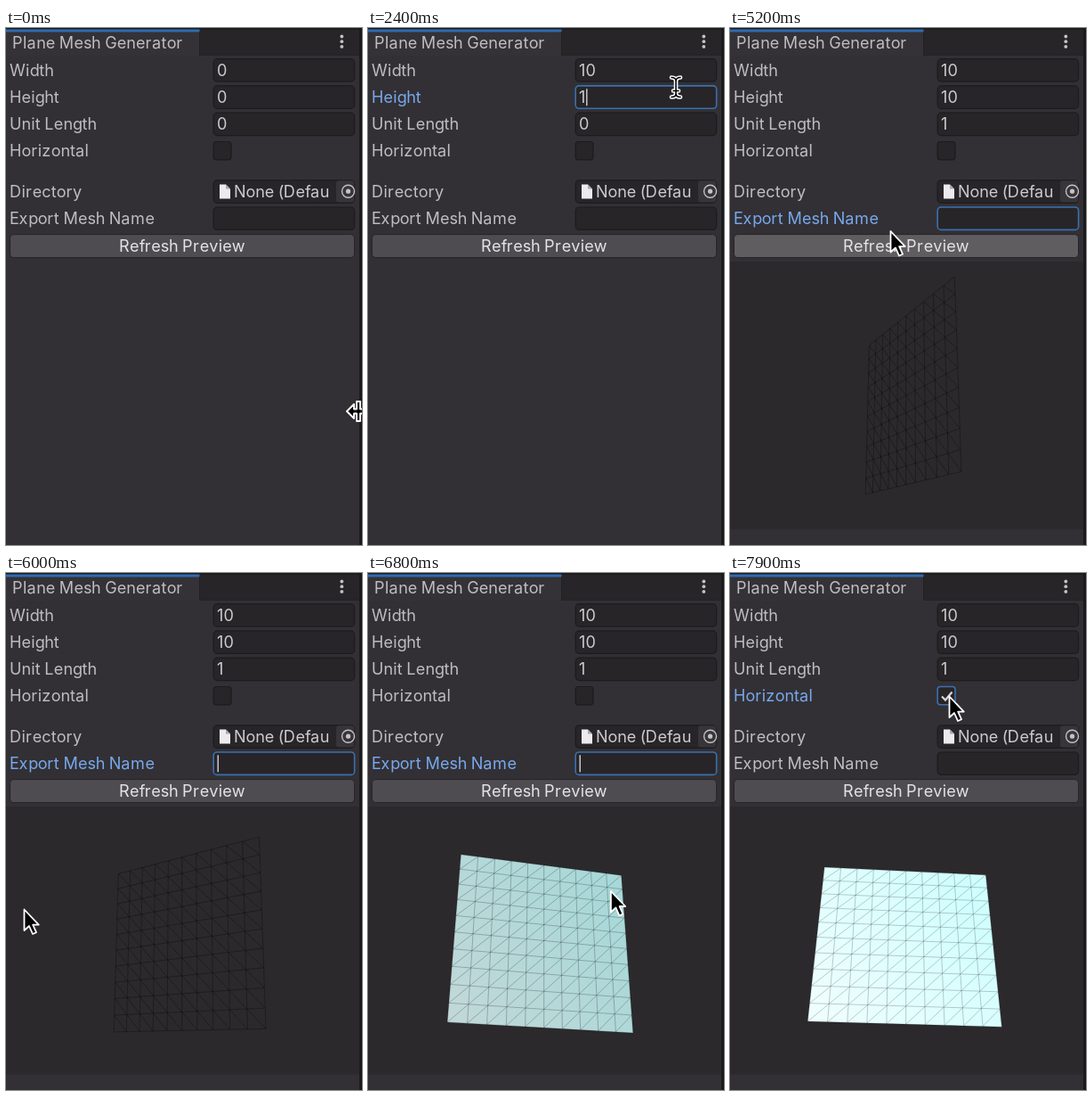
An HTML page for the animation above (8 s loop, 400x580 px).

```html
<!DOCTYPE html>
<html lang="en">
<head>
<meta charset="utf-8">
<title>Plane Mesh Generator</title>
<style>
html, body { margin: 0; width: 100%; height: 100%; overflow: hidden; background: #323034; }
svg { display: block; width: 100vw; height: 100vh; }
text { font: 18.1px Inter, "Open Sans", sans-serif; font-optical-sizing: none; font-kerning: none; fill: #bfbdc0; white-space: pre; }
.box { fill: #272528; stroke: #1c1b1d; stroke-width: 1.2; }
.box.on { stroke: #3a70ae; stroke-width: 1.6; }
.label.on { fill: #78a8ec; }
.value { fill: #cccacd; }
.caret { fill: #c8c6c9; }
.cursor path { stroke-linejoin: round; stroke-linecap: round; }
</style>
</head>
<body>
<svg id="stage" viewBox="0 0 400 580" preserveAspectRatio="none"></svg>
<script>
const NS = 'http://www.w3.org/2000/svg';
const stage = document.getElementById('stage');
const LOOP = 8000, STEP = 100, LABEL_LAG = 200;

function el(tag, attrs = {}, parent = stage) {
  const node = document.createElementNS(NS, tag);
  set(node, attrs);
  parent.appendChild(node);
  return node;
}
function set(node, attrs) { for (const key in attrs) node.setAttribute(key, attrs[key]); }
const show = (node, on) => { node.style.display = on ? '' : 'none'; };
const rect = (x, y, width, height, more) => el('rect', { x, y, width, height, ...more });
const clamp = (v, lo, hi) => Math.min(hi, Math.max(lo, v));

// The interface sets 12 px type on whole-pixel advances, then scales it up
const UI_SCALE = 1.51;
const ruler = document.createElement('canvas').getContext('2d');
ruler.font = '12px Inter, "Open Sans", sans-serif';
const advance = ch => Math.round(ruler.measureText(ch).width) * UI_SCALE;
const measure = text => [...text].reduce((sum, ch) => sum + advance(ch), 0);

function write(node, text, x) {
  if (node.textContent === text) return;
  const xs = [...text].map((ch, i) => (x + measure(text.slice(0, i))).toFixed(2));
  set(node, { x: xs.join(' ') });
  node.textContent = text;
}
function label(text, x, y, more) {
  const node = el('text', { y, ...more });
  write(node, text, x);
  return node;
}

// Window chrome
rect(0, 0, 400, 580, { fill: '#323034' });
rect(0, 0, 400, 31, { fill: '#272528' });
rect(0, 0, 400, 2, { fill: '#1d1c1e' });
rect(217, 30, 180, 1, { fill: '#232224' });
rect(0, 2, 217, 29, { fill: '#343236' });
rect(0, 1.5, 217.5, 3, { fill: '#2e6cb2' });
rect(217, 4, 1, 27, { fill: '#222123' });
label('Plane Mesh Generator', 7, 23.2);
for (const cy of [9.5, 15.2, 20.9]) el('circle', { cx: 377.3, cy, r: 1.9, fill: '#c4c2c5' });

// Form rows
const ROWS = {
  width: ['Width', 47], height: ['Height', 77.2], unit: ['Unit Length', 107.5],
  horizontal: ['Horizontal', 137.8], directory: ['Directory', 183.2], name: ['Export Mesh Name', 213.3]
};
const VALUE_X = 237;
const rows = {};
for (const id in ROWS) {
  const [title, y] = ROWS[id];
  const check = id === 'horizontal';
  rows[id] = {
    label: label(title, 4, y + 6.5, { class: 'label' }),
    box: rect(233.2, y - (check ? 10.3 : 12.3), check ? 19.8 : 158.4, check ? 20.3 : 25.4, { rx: check ? 3 : 4, class: 'box' }),
    pick: rect(236.5, y - 10, 13, 20, { fill: '#3d6797' }),
    value: el('text', { y: y + 6.5, class: 'value' }),
    caret: rect(238, y - 9, 1.5, 19, { class: 'caret' })
  };
}
const tick = el('path', { d: 'M238 138.5l4 4 7.5-9', fill: 'none', stroke: '#d8d6d9', 'stroke-width': 2.2 });

write(rows.directory.value, 'None (Defau', 256);
rect(371, 171.3, 20.3, 24.2, { rx: 3, fill: '#373539' });
el('path', { d: 'M240 175.5h7l5 5v11h-12z', fill: '#eceaed' });
el('path', { d: 'M247 175.5v5h5z', fill: '#aaa8ab' });
el('circle', { cx: 384.5, cy: 183.2, r: 7, fill: 'none', stroke: '#c4c2c5', 'stroke-width': 1.4 });
el('circle', { cx: 384.5, cy: 183.2, r: 2.6, fill: '#c4c2c5' });

const button = rect(4.5, 231.6, 387, 26, { rx: 4, stroke: '#252326', 'stroke-width': 1 });
const caption = 'Refresh Preview';
label(caption, 198 - measure(caption) / 2, 250.9, { style: 'fill:#e4e2e5' });

// Preview
const preview = el('g');
el('rect', { x: 0, y: 262, width: 397, height: 300.5, fill: '#2b292c' }, preview);
const shade = el('linearGradient', { id: 'shade', x1: 0, y1: 0.8, x2: 0.9, y2: 0.2 }, preview);
const stops = [0, 1].map(offset => el('stop', { offset }, shade));
const face = el('path', { fill: 'url(#shade)' }, preview);
const wire = el('path', { fill: 'none', stroke: '#000', 'stroke-width': 0.7 }, preview);
rect(397, 0, 3, 580, { fill: '#1a191b' });

// Cursors, hot spot at 0,0
const BEAM = 'M-5 -11Q0 -11 0 -7V7Q0 11 -5 11M5 -11Q0 -11 0 -7V7Q0 11 5 11M-3 4H3';
const CURSORS = {
  arrow: [['M0.5 1.5V25L6 20L10 29L14 27.2L10.2 18.6H16.8Z', '#000', '#fff', 1.8]],
  beam: [[BEAM, 'none', '#fff', 4.6], [BEAM, 'none', '#000', 1.6]],
  resize: [['M-13 0L-5 -8V-2.5H-2V-11H2V-2.5H5V-8L13 0L5 8V2.5H2V11H-2V2.5H-5V8Z', '#000', '#fff', 1.9]]
};
const cursors = {};
for (const kind in CURSORS) {
  cursors[kind] = el('g', { class: 'cursor' });
  for (const [d, fill, stroke, w] of CURSORS[kind])
    el('path', { d, fill, stroke, 'stroke-width': w }, cursors[kind]);
}

// Motion: [time, values...]
const POINTER = [
  [0, 396, 430], [900, 338, 48], [1000, 338, 48], [1200, 345, 77], [1300, 346, 66.5],
  [2900, 346, 66.5], [3400, 168, 171], [3500, 168, 171], [3900, 262, 212], [4000, 262, 212],
  [4300, 180, 226.5], [5200, 180, 226.5], [5500, 62, 366], [6000, 20, 376], [6100, 16, 378],
  [6400, 218, 401], [6900, 286, 344], [7100, 242, 249], [7300, 242, 246], [7800, 246, 140], [7900, 246, 137]
];
const ORBIT = [
  [5500, 120, 18], [6000, 145, 12], [6100, 138, 11], [6400, 42.7, 0], [6900, 6, 30], [7000, 4.3, 31]
];
const FOCUS = [[0, ''], [900, 'width'], [2200, 'height'], [2800, 'unit'], [4000, 'name'], [7700, 'horizontal']];
const TYPED = {
  width: [[0, '0'], [1700, '1'], [1900, '10']],
  height: [[0, '0'], [2400, '1'], [2600, '10']],
  unit: [[0, '0'], [3100, '1']],
  name: [[0, '']]
};

function tween(keys, t) {
  const i = keys.findIndex(k => k[0] > t);
  if (i === 0) return keys[0].slice(1);
  if (i < 0) return keys[keys.length - 1].slice(1);
  const a = keys[i - 1], b = keys[i], p = (t - a[0]) / (b[0] - a[0]);
  return a.slice(1).map((v, n) => v + (b[n + 1] - v) * p);
}
const hold = (keys, t) => keys.reduce((v, k) => (t >= k[0] ? k[1] : v), keys[0][1]);

function drawMesh(yaw, pitch) {
  const rad = Math.PI / 180;
  const cy = Math.cos(yaw * rad), sy = Math.sin(yaw * rad);
  const cp = Math.cos(pitch * rad), sp = Math.sin(pitch * rad);
  const at = (u, v) => {
    const z = u * sy;
    const s = 554 / (5.581 + z * cp - v * sp);
    return (197.7 + u * cy * s).toFixed(2) + ' ' + (412.4 + (v * cp + z * sp) * s).toFixed(2);
  };
  const line = (a, b, c, d) => `M${at(a, b)}L${at(c, d)}`;
  let d = '';
  for (let i = -5; i <= 5; i++) d += line(i / 5, -1, i / 5, 1) + line(-1, i / 5, 1, i / 5);
  for (let i = -9; i <= 9; i++) {
    const c = i / 5, lo = Math.max(-1, c - 1), hi = Math.min(1, c + 1);
    d += line(lo, c - lo, hi, c - hi);
  }
  // Only the front side is filled
  const front = cy * cp > 0;
  const lit = clamp((42.7 - yaw) / 38.4, -0.2, 1);
  const mix = (a, b) => Math.round(a + (b - a) * lit);
  show(face, front);
  set(face, { d: `M${at(-1, -1)}L${at(1, -1)}L${at(1, 1)}L${at(-1, 1)}Z` });
  [238, 207].forEach((red, i) =>
    set(stops[i], { 'stop-color': `rgb(${mix(42, red)},${mix(93, 254)},${mix(93, 254)})` }));
  set(wire, { d, 'stroke-opacity': 0.45 - 0.15 * Math.max(0, lit) });
}

function render(t) {
  const focus = hold(FOCUS, t), named = hold(FOCUS, t - LABEL_LAG);
  const blink = t < 5200 || Math.floor((t - 5200) / 470) % 2 === 1;
  for (const id in rows) {
    const r = rows[id], on = id === focus, keys = TYPED[id];
    r.box.classList.toggle('on', on);
    r.label.classList.toggle('on', id === named);
    let picked = false;
    if (keys) {
      const text = hold(keys, t);
      write(r.value, text, VALUE_X);
      set(r.caret, { x: VALUE_X + 0.5 + measure(text) });
      picked = on && text === '0';
    }
    show(r.pick, picked);
    show(r.caret, on && keys && !picked && (id !== 'name' || blink));
  }
  show(tick, t >= 7800);

  const [x, y] = tween(POINTER, t);
  const overButton = y > 226 && y < 258 && x < 392;
  const pressed = t >= 4500 && t < 4600;
  set(button, { fill: pressed ? '#46607c' : overButton ? '#5f5d60' : '#4e4c50' });

  show(preview, t >= 4600);
  drawMesh(...tween(ORBIT, t));

  const overField = x > 232 && x < 392 && ((y > 33 && y < 121) || (y > 200 && y < 226));
  const kind = t < 100 ? 'resize' : overField ? 'beam' : 'arrow';
  for (const k in cursors) show(cursors[k], k === kind);
  set(cursors[kind], { transform: `translate(${x.toFixed(2)} ${y.toFixed(2)})` });
}

const start = performance.now();
function frame() {
  const t = (performance.now() - start) % LOOP;
  render(Math.floor(t / STEP) * STEP);
  requestAnimationFrame(frame);
}
frame();
</script>
</body>
</html>
```
